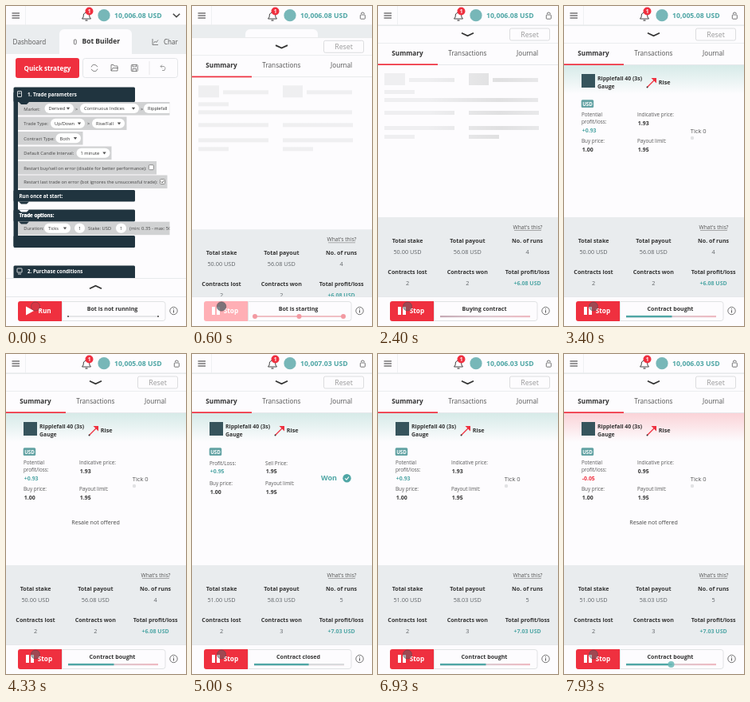
An HTML page with a canvas that plays this animation: 226x400 px, repeating every 8 s.

```html
<!DOCTYPE html>
<html lang="en">
<head>
<meta charset="utf-8">
<title>Trading bot run</title>
<style>
html, body { margin: 0; width: 100%; height: 100%; overflow: hidden; background: #fff; }
canvas { display: block; width: 226px; height: 400px; }
</style>
</head>
<body>
<canvas id="stage"></canvas>
<script>
const W = 226, H = 400, LOOP = 8000;
const RED = '#ef303f', TEAL = '#4fa6a5', INK = '#333', GREY = '#606468', NAVY = '#20343f', PAPER = '#fdfcfe';
const canvas = document.getElementById('stage');
const ratio = window.devicePixelRatio || 1;
canvas.width = W * ratio;
canvas.height = H * ratio;
const ctx = canvas.getContext('2d');
ctx.scale(ratio, ratio);

const clamp = v => Math.max(0, Math.min(1, v));
const span = (t, from, to) => clamp((t - from) / (to - from));
const easeOut = p => 1 - (1 - p) ** 2;

function rect(x, y, w, h, color) {
  ctx.fillStyle = color;
  ctx.fillRect(x, y, w, h);
}

function box(x, y, w, h, r, fill, stroke) {
  ctx.beginPath();
  ctx.roundRect(x, y, w, h, r);
  if (fill) { ctx.fillStyle = fill; ctx.fill(); }
  if (stroke) { ctx.strokeStyle = stroke; ctx.lineWidth = 0.8; ctx.stroke(); }
}

function disc(x, y, r, fill, stroke, width = 0.8) {
  ctx.beginPath();
  ctx.arc(x, y, r, 0, Math.PI * 2);
  if (fill) { ctx.fillStyle = fill; ctx.fill(); }
  if (stroke) { ctx.strokeStyle = stroke; ctx.lineWidth = width; ctx.stroke(); }
}

function line(points, color, width = 0.8) {
  ctx.beginPath();
  points.forEach(([x, y]) => ctx.lineTo(x, y));
  ctx.strokeStyle = color;
  ctx.lineWidth = width;
  ctx.stroke();
}

function shape(points, color) {
  ctx.beginPath();
  points.forEach(([x, y]) => ctx.lineTo(x, y));
  ctx.fillStyle = color;
  ctx.fill();
}

function text(str, x, y, size, { bold = false, color = INK, align = 'left' } = {}) {
  ctx.font = `${bold ? 700 : 400} ${size}px "Open Sans", "Noto Sans", sans-serif`;
  ctx.textAlign = align;
  ctx.fillStyle = color;
  ctx.fillText(str, x, y);
}

function shade(x0, y0, x1, y1, ...colors) {
  const g = ctx.createLinearGradient(x0, y0, x1, y1);
  colors.forEach((c, i) => g.addColorStop(i / (colors.length - 1), c));
  return g;
}

function stateAt(t) {
  const closed = t >= 4720 && t < 5620;
  const bought = t >= 2550 && !closed;
  let status = 'Bot is not running';
  if (t >= 200) status = 'Bot is starting';
  if (t >= 2050) status = 'Buying contract';
  if (bought) status = 'Contract bought';
  if (closed) status = t < 5350 ? 'Contract closed' : 'Buying contract';
  let balance = '10,006.08 USD';
  if (t >= 2600) balance = '10,005.08 USD';
  if (t >= 4750) balance = '10,007.03 USD';
  if (t >= 5680) balance = '10,006.03 USD';
  return { t, closed, bought, settled: t >= 4720, status, balance, losing: t >= 7250, running: t >= 200 };
}

function drawHeader(s) {
  rect(0, 0, W, 24, PAPER);
  rect(0, 23.5, W, 0.8, '#e4e6e8');
  rect(24, 0, 0.8, 24, '#eceef0');
  for (const y of [9, 12, 15]) line([[7.5, y], [17, y]], '#444', 1.1);
  line([[95.5, 16], [97, 14], [97.5, 10], [101, 7.5], [104.5, 10], [105, 14], [106.5, 16], [95.5, 16]], '#444', 1);
  line([[99.5, 18], [102.5, 18]], '#444', 1.2);
  disc(104.5, 6.5, 5, RED);
  text('1', 104.5, 8.9, 6.5, { bold: true, color: '#fff', align: 'center' });
  disc(123, 11.7, 7.6, '#77b7b8');
  text(s.balance, 136, 14.8, 8.7, { bold: true, color: TEAL });
  if (s.running) {
    box(211.3, 11, 6, 5.2, 0.8, null, '#555');
    ctx.beginPath();
    ctx.arc(214.3, 10, 2, Math.PI, 0);
    ctx.stroke();
  } else {
    line([[209.8, 9.7], [214, 13.8], [218.2, 9.7]], '#444', 1.5);
  }
}

function drawToolbar() {
  rect(0, 24, W, 36, '#eaedef');
  box(67, 29, 91, 34, [6, 6, 0, 0], PAPER);
  text('Dashboard', 8.5, 47.5, 8.1, { color: '#555' });
  box(85.4, 42, 2.8, 5.8, 1, null, '#555');
  text('Bot Builder', 95.5, 47.3, 8.5, { bold: true });
  line([[184, 41], [184, 48.5], [191, 48.5]], '#666');
  line([[185.5, 46.5], [187.3, 44], [188.7, 45.5], [191, 42.5]], '#666');
  text('Char', 198, 47.5, 8.1, { color: '#555' });
  rect(0, 60, W, 280, PAPER);
  box(12, 65, 80, 25, 3, RED);
  text('Quick strategy', 52, 80.5, 8.1, { bold: true, color: '#fff', align: 'center' });
  box(96.5, 65.5, 119, 24, 3, null, '#dde0e3');
  ctx.strokeStyle = '#666';
  for (const a of [0.3, 3.44]) {
    ctx.beginPath();
    ctx.arc(111, 77.5, 4, a, a + 2.5);
    ctx.stroke();
  }
  line([[132, 81], [132, 73.5], [135, 73.5], [136, 75], [140, 75], [140, 81], [132, 81], [134, 77.5], [141, 77.5]], '#666');
  box(157.3, 73.5, 8, 8, 0.8, null, '#666');
  line([[159, 73.5], [159, 76], [163.5, 76], [163.5, 73.5]], '#666');
  line([[159, 81.5], [159, 78.5], [163.5, 78.5], [163.5, 81.5]], '#666');
  line([[180, 69], [180, 86]], '#e2e4e6');
  line([[196, 73.5], [194, 75.5], [196, 77.5]], '#888');
  line([[194, 75.5], [198.5, 75.5], [200, 77.5], [199, 80.5], [196, 80.5]], '#888');
}

function pill(label, x, y, w, arrow = true) {
  box(x, y, w, 12, 6, '#fff');
  text(label, x + 5, y + 8.2, 5.7);
  if (!arrow) return;
  const ax = x + w - 7;
  shape([[ax - 2.2, y + 4.8], [ax + 2.2, y + 4.8], [ax, y + 7.7]], '#555');
}

function blockRow(label, y, right) {
  rect(15, y, right - 15, 16.5, '#d1d2d3');
  text(label, 22.3, y + 10.5, 5.75, { color: '#444' });
}

function blockBar(label, y, h, x = 16.5) {
  box(9.5, y, 152.5, h, 1.5, NAVY);
  text(label, x, y + 9.5, 6.2, { bold: true, color: '#fff' });
}

function notch(y, color) {
  shape([[16, y], [29, y], [26, y + 3], [19, y + 3]], color);
}

function checkbox(x, y, checked) {
  box(x, y, 6, 6, 1, '#fff', '#777');
  if (checked) line([[x + 1.3, y + 3], [x + 2.6, y + 4.5], [x + 4.8, y + 1.5]], '#444');
}

function drawBlocks() {
  ctx.save();
  ctx.beginPath();
  ctx.rect(0, 95, 205.5, 245);
  ctx.clip();
  rect(9.5, 108, 5.5, 192, NAVY);
  blockBar('1. Trade parameters', 101.5, 18.5, 27);
  text('1. Trade parameters', 27, 113, 6.2, { bold: true, color: NAVY });
  rect(26, 104, 70, 14, NAVY);
  text('1. Trade parameters', 27, 113, 6.2, { bold: true, color: '#fff' });
  box(14.5, 106.5, 5, 7, 0.5, null, '#fff');
  line([[15.5, 109], [18.5, 109]], '#fff');

  blockRow('Market:', 120, 207);
  pill('Derived', 48.5, 122, 36.5);
  pill('Continuous Indices', 93, 122, 74);
  pill('Ripplefall', 173, 122, 44);
  text('>', 87, 130.5, 5.5);
  text('>', 169, 130.5, 5.5);
  blockRow('Trade Type:', 138.5, 151.5);
  pill('Up/Down', 56, 140.7, 43);
  text('>', 102, 149.2, 5.5);
  pill('Rise/Fall', 108, 140.7, 41);
  blockRow('Contract Type:', 157, 96.5);
  pill('Both', 62.5, 159.3, 31.5);
  blockRow('Default Candle Interval:', 175.5, 132.5);
  pill('1 minute', 88.5, 177.7, 42);
  blockRow('Restart buy/sell on error (disable for better performance):', 194, 189);
  checkbox(179.3, 198.7, false);
  blockRow('Restart last trade on error (bot ignores the unsuccessful trade):', 211.5, 202.5);
  checkbox(193.5, 216.5, true);
  notch(120, NAVY);

  blockBar('Run once at start:', 230, 14.5);
  blockBar('Trade options:', 254.5, 15);
  notch(244.5, NAVY);
  notch(254.5, PAPER);
  text('Trade options:', 16.5, 264, 6.2, { bold: true, color: '#fff' });
  blockRow('Duration:', 269.7, 207);
  pill('Ticks', 48, 271.8, 33);
  pill('1', 86, 271.8, 13, false);
  text('Stake: USD', 103, 280.2, 5.75, { color: '#444' });
  pill('1', 138, 271.8, 13, false);
  text('(min: 0.35 - max: 50)', 155, 280.2, 5.75, { color: '#444' });
  notch(269.5, NAVY);
  box(9.5, 287, 152.5, 15, 1.5, NAVY);

  blockBar('2. Purchase conditions', 324.5, 20, 27);
  box(14, 328, 6, 5, 0.5, null, '#fff');
  line([[15, 335], [19, 335]], '#fff');
  ctx.restore();
}

function drawSkeleton(t) {
  const sweep = ((t % 1500) / 1500) * 420 - 100;
  const dark = Math.round(239 - 15 * span(t, 650, 1100));
  const base = '#efeff1';
  ctx.fillStyle = shade(sweep - 90, 0, sweep + 90, 0, base, `rgb(${dark},${dark},${dark + 1})`, base);
  const bars = [[8, 84, 26, 15], [39, 90, 57, 5], [114, 84, 25, 15], [144, 90, 57, 5],
    [8, 105, 38, 5], [8, 115, 193, 5]];
  for (const x of [8, 114]) bars.push([x, 131, 88, 5], [x, 150, 88, 5], [x, 161, 38, 5]);
  bars.forEach(b => ctx.fillRect(...b));
}

function field(label, value, x, y, color = INK) {
  const lines = label.split('\n');
  lines.forEach((part, i) => text(part, x, y + i * 9, 6.3, { color: '#555' }));
  text(value, x + 0.8, y + lines.length * 9 + 1.8, 6.9, { bold: true, color });
}

function drawCard(s) {
  const tint = s.losing ? '240,48,62' : '60,165,145';
  rect(0, 74, W, 36, shade(0, 74, 0, 110, `rgba(${tint},.2)`, `rgba(${tint},.1)`, `rgba(${tint},0)`));
  rect(22, 85, 17, 17, '#36545c');
  text('Ripplefall 40 (3s)', 42, 92.5, 6.9, { bold: true });
  text('Gauge', 42, 102.7, 6.9, { bold: true });
  line([[104.5, 101.5], [113.5, 92.5]], RED, 1.3);
  shape([[109.5, 90], [116, 90], [116, 96.5]], RED);
  disc(104.5, 101.5, 1, INK);
  text('Rise', 118.7, 98, 7.3, { bold: true });
  box(21.7, 117.3, 15.5, 9.7, 1.5, '#62a2a3');
  text('USD', 29.5, 124.5, 6.2, { bold: true, color: '#fff', align: 'center' });

  if (s.closed) {
    field('Profit/Loss:', '+0.95', 22, 138.5, TEAL);
    field('Sell Price:', '1.95', 92, 138.5);
    text('Won', 162, 158.3, 9, { bold: true, color: TEAL });
    disc(194.5, 155.2, 5.2, TEAL);
    line([[192.1, 155.4], [194, 157.2], [197, 153.5]], '#fff', 1.1);
  } else {
    field('Potential\nprofit/loss:', s.losing ? '-0.05' : '+0.93', 22, 138, s.losing ? RED : TEAL);
    field('Indicative price:', s.losing ? '0.95' : '1.93', 92, 138);
    text('Tick 0', 158.8, 159, 7.5, { color: '#555' });
    disc(161, 165, 2.2, '#e1e2e4');
    if (s.losing || (s.t >= 4150 && s.t < 4720)) {
      text('Resale not offered', 112.5, 213, 7.1, { align: 'center', color: '#444' });
    }
  }
  const priceY = s.closed ? 164.3 : 171;
  field('Buy price:', '1.00', 22, priceY);
  field('Payout limit:', '1.95', 92, priceY);
}

function drawStats(s) {
  rect(0, 264, W, 110, '#e9ecee');
  text("What's this?", 188, 279, 6.7, { align: 'center', color: '#555' });
  line([[171, 280.5], [205, 280.5]], '#777', 0.6);
  const stats = [
    ['Total stake', s.settled ? '51.00 USD' : '50.00 USD'],
    ['Total payout', s.settled ? '58.03 USD' : '56.08 USD'],
    ['No. of runs', s.settled ? '5' : '4'],
    ['Contracts lost', '2'],
    ['Contracts won', s.settled ? '3' : '2'],
    ['Total profit/loss', s.settled ? '+7.03 USD' : '+6.08 USD']
  ];
  stats.forEach(([label, value], i) => {
    const x = 37 + (i % 3) * 75.3;
    const y = i < 3 ? 295.5 : 335;
    const profit = i === 5;
    text(label, x, y, 7.1, { bold: true, align: 'center' });
    text(value, x, y + 14, profit ? 7 : 7.3, { bold: profit, color: profit ? TEAL : GREY, align: 'center' });
  });
}

function drawPanel(s) {
  const shift = 316 * (1 - easeOut(span(s.t, 250, 700)));
  ctx.save();
  ctx.translate(0, shift);
  rect(0, 24, W, 376, PAPER);
  rect(0, 24, W, 0.8, '#e4e6e8');
  const dir = s.running ? 1 : -1;
  line([[105, 35.5 - 1.7 * dir], [112.5, 35.5 + 1.7 * dir], [120, 35.5 - 1.7 * dir]], INK, 1.8);
  if (s.running) {
    box(165.5, 28, 50, 15, 2, PAPER, '#d3d5d7');
    text('Reset', 190.5, 38.7, 8.8, { color: '#999', align: 'center' });
    rect(0, 46, W, 0.8, '#e8eaec');
    ['Summary', 'Transactions', 'Journal'].forEach((tab, i) =>
      text(tab, 37 + i * 75.3, 62, 8.2, { bold: i === 0, color: i ? '#555' : INK, align: 'center' }));
    rect(0, 73, W, 0.8, '#e2e4e6');
    rect(0, 72.3, 75, 1.7, RED);
    if (s.t < 2450) drawSkeleton(s.t);
    else drawCard(s);
    drawStats(s);
  }
  ctx.restore();
}

function drawProgress(s) {
  const x0 = 78, x1 = 191, mid = 134.5, y = 388;
  if (!s.running) {
    line([[x0, y], [x1, y]], '#cfd1d3', 1);
    disc(x0, y, 0.9, INK);
    disc(x1, y, 0.9, INK);
    return;
  }
  if (s.t < 1000) {
    line([[x0, y], [x1, y]], '#ecacb2', 1.6);
    for (const x of [79, mid, 190]) disc(x, y, 3 * (1 - span(s.t, 800, 1000)), '#f39aa2');
    return;
  }
  rect(x0, y - 1, x1 - x0, 2.2, shade(x0, 0, x1, 0, '#c5a9b4', '#dccbd1', '#efb9c1'));
  let end = x0;
  if (s.bought) end += (mid + 1 - x0) * span(s.t, s.settled ? 5620 : 2550, s.settled ? 5880 : 2850);
  if (s.closed && s.t < 5350) {
    rect(mid, y - 1, x1 - mid, 2.2, '#d9dbdd');
    end = mid + (x1 - mid) * span(s.t, 4860, 5520);
  }
  rect(x0, y - 1.1, end - x0, 2.4, TEAL);
  if (s.t > 7700) disc(mid, y, 4 * span(s.t, 7700, 7850), 'rgba(105,185,182,.85)');
}

function drawControls(s) {
  rect(0, 363, W, 37, PAPER);
  rect(0, 363, W, 0.8, '#e2e4e6');
  const disabled = s.running && s.t < 1150;
  box(15, 369, 55, 25, [3, 0, 0, 3], disabled ? '#ffafb5' : RED);
  if (s.running) {
    rect(25, 376, 4, 10, '#fff');
    rect(31, 376, 4, 10, '#fff');
    text('Stop', 39.8, 384.2, 8.2, { bold: true, color: '#fff' });
  } else {
    shape([[25, 375.5], [35, 381], [25, 386.5]], '#fff');
    text('Run', 40.5, 384.2, 8.2, { bold: true, color: '#fff' });
  }
  box(70.5, 369.5, 129.5, 24, [0, 3, 3, 0], PAPER, '#dadcde');
  text(s.status, 133.5, 380.7, 7.1, { bold: true, align: 'center' });
  drawProgress(s);
  disc(210.5, 381, 4.7, null, '#555');
  line([[210.5, 380.2], [210.5, 383.5]], '#555', 1);
  disc(210.5, 378.6, 0.6, '#555');
}

function drawPointer(t) {
  const pressed = t >= 130 && t < 800;
  const alpha = t < 130 ? 0.15 : pressed ? 0.75 : 0.5;
  disc(37, 375.5, pressed ? 5.8 : 5.5, `rgba(80,95,102,${alpha})`, 'rgba(80,70,76,.6)', 0.8);
}

function draw(t) {
  const s = stateAt(t);
  rect(0, 0, W, H, PAPER);
  drawToolbar();
  drawBlocks();
  drawPanel(s);
  drawHeader(s);
  drawControls(s);
  drawPointer(t);
}

const start = performance.now();
function tick() {
  draw((performance.now() - start) % LOOP);
  requestAnimationFrame(tick);
}
tick();
</script>
</body>
</html>
```
